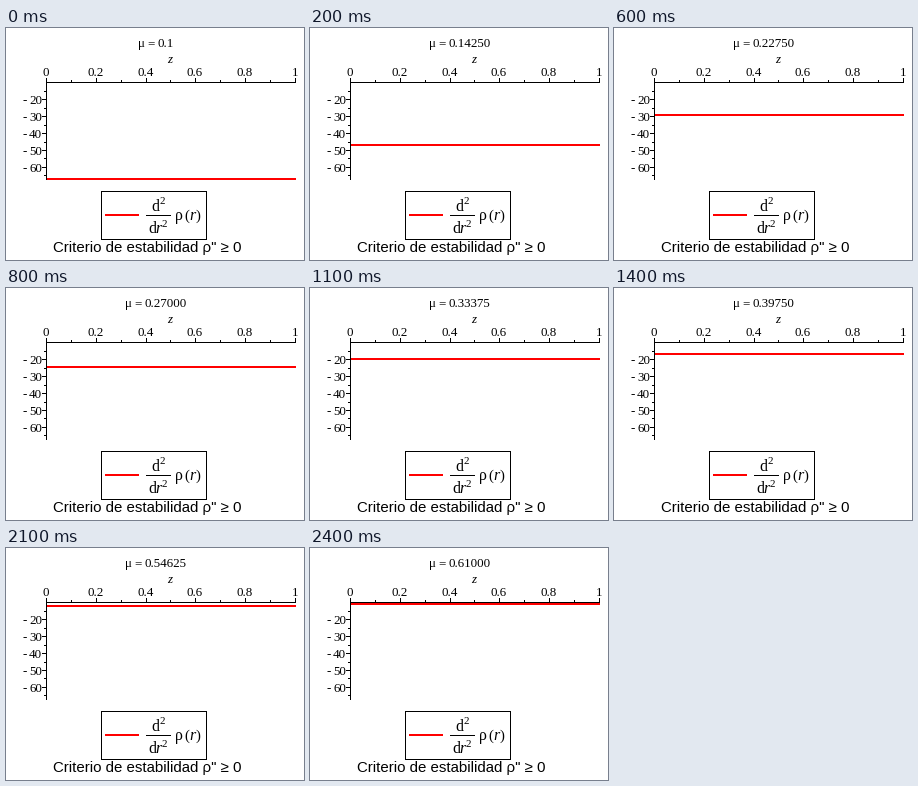
Write a matplotlib script that moves like this. It is 298 px wide and 232 px high and loops after 2500 ms.

```python
import matplotlib.pyplot as plt
from matplotlib.animation import FuncAnimation
from matplotlib.patches import Rectangle

W, H, DPI = 298, 232, 64
FRAMES, INTERVAL = 25, 100
LEFT, RIGHT, TOP, BOTTOM = 40, 289, 54, 152
RED = "#ff0000"

fig = plt.figure(figsize=(W / DPI, H / DPI), dpi=DPI, facecolor="white")
ax = fig.add_axes([0, 0, 1, 1])
ax.set(xlim=(0, W), ylim=(H, 0))
ax.axis("off")


def bar(x, y, w, h, color="black", z=2):
    return ax.add_patch(Rectangle((x, y), w, h, facecolor=color, linewidth=0,
                                  antialiased=False, zorder=z))


def label(x, y, s, size=13, ha="left", style="normal", font="Liberation Serif"):
    return ax.text(x, y, s, fontsize=size * 72 / DPI, ha=ha, va="baseline",
                   style=style, family=font, color="black")


def row(value):
    return TOP + 0.4 + (-10 - value) * 1.69


def draw_axes():
    bar(LEFT, TOP, RIGHT - LEFT + 1, 1)
    bar(LEFT, TOP, 1, BOTTOM - TOP)
    for i in range(11):
        x = round(LEFT + (RIGHT - LEFT) * i / 10)
        size = 2 if i % 2 else 4
        bar(x, TOP - size, 1, size)
        if i % 2 == 0:
            label(x, 48, f"{i / 10:g}", ha="center")
    for value in range(-15, -66, -5):
        y = round(row(value))
        size = 2 if value % 10 else 4
        bar(LEFT - size, y, size, 1)
        if value % 10 == 0:
            label(16.5, y + 5, "-")
            label(36, y + 5, f"{-value}", ha="right")
    label(164, 35, "z", ha="center", style="italic")


def draw_legend():
    x, y, w, h = 95, 163, 106, 49
    for edge in ((x, y, w, 1), (x, y + h - 1, w, 1),
                 (x, y, 1, h), (x + w - 1, y, 1, h)):
        bar(*edge)
    bar(99, 186, 34, 2, RED)
    bar(140, 187, 25, 1)
    label(145, 183, "d", 16)
    label(153, 176, "2", 11)
    label(142, 205, "d", 16)
    label(149, 205, "r", 16, style="italic")
    label(156, 199, "2", 11)
    label(169, 192, "\u03c1", 16)
    label(178, 192, "(", 15)
    label(183, 192, "r", 16, style="italic")
    label(190, 192, ")", 15)


draw_axes()
draw_legend()
label(47, 224, "Criterio de estabilidad \u03c1\" \u2265 0", 15,
      font="Liberation Sans")

line = bar(LEFT + 1, TOP, RIGHT - LEFT, 2, RED, z=3)
title = [label(0, 19, s) for s in ("\u03bc", "=", "")]


def update(i):
    mu = 0.1 + 0.02125 * i
    line.set_y(round(row(-6.7 / mu)) - 1)
    text = f"{mu:.5f}" if i else "0.1"
    title[2].set_text(text)
    start = 150 - (20 + 6.5 * len(text) - 3.25) / 2
    for part, dx in zip(title, (0, 9, 20)):
        part.set_x(start + dx)
    return [line, *title]


anim = FuncAnimation(fig, update, frames=FRAMES, interval=INTERVAL,
                     repeat=True, repeat_delay=0, blit=False)
plt.show()
```
